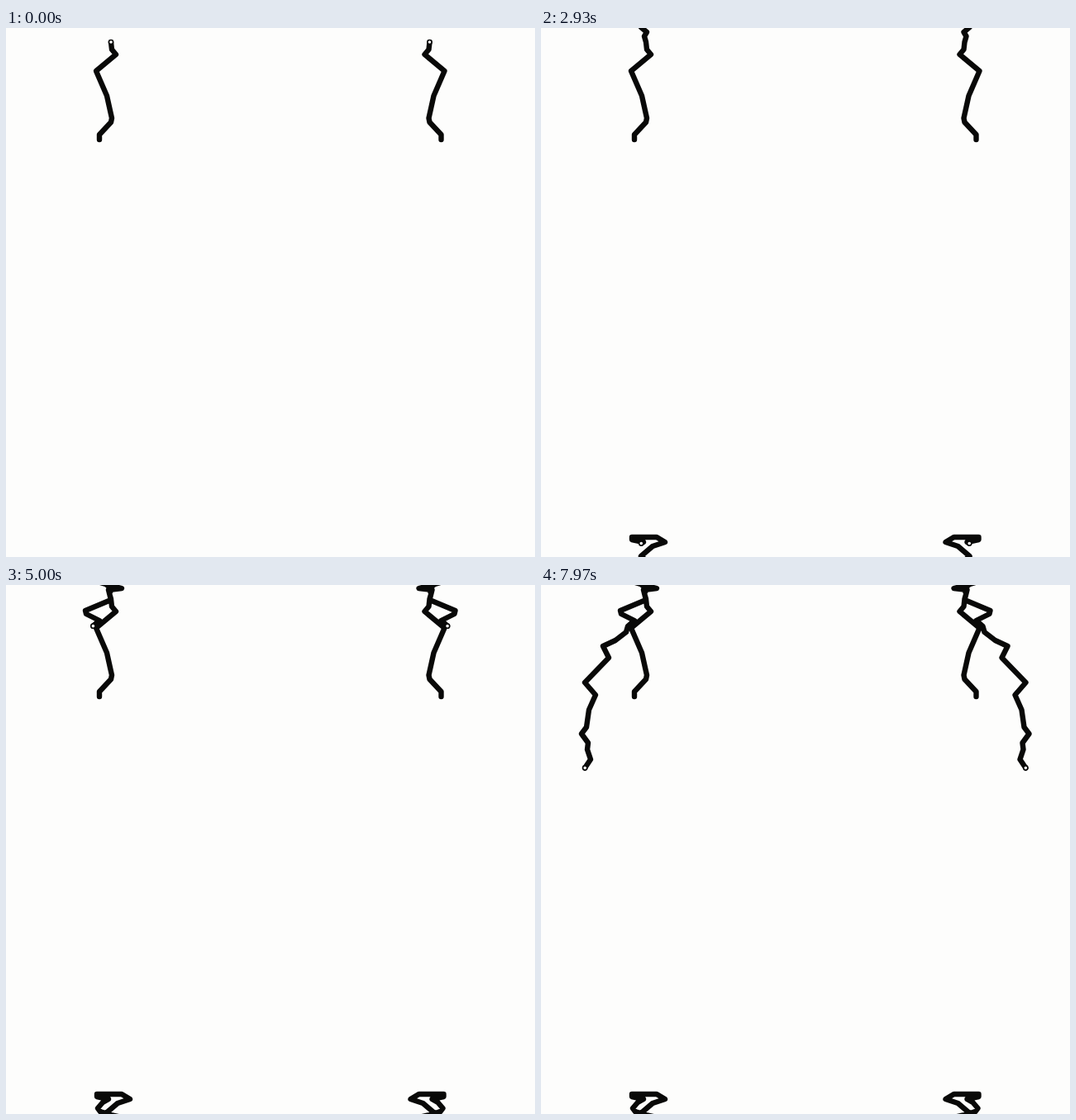
Write an HTML page without scripts that moves like this. It is 640 px wide and 640 px high and loops after 8000 ms.

```html
<!DOCTYPE html>
<html lang="en">
<head>
<meta charset="utf-8">
<title>Mirrored walk</title>
<style>
  html, body { margin: 0; width: 100%; height: 100%; overflow: hidden; background: #fdfdfc; }
  svg { display: block; width: 100vw; height: 100vh; }
  #walk { fill: none; stroke: #090908; stroke-width: 6.4; stroke-linecap: round; stroke-linejoin: round; }
  .tip { fill: #fdfdfc; stroke: #090908; stroke-width: 1.6; }
</style>
</head>
<body>
<svg viewBox="0 0 640 640">
  <defs>
    <!-- One walk, revealed by its dash; y < 0 reappears at the bottom in the lower copy -->
    <g id="side">
      <path id="walk" pathLength="617" stroke-dasharray="617 700" stroke-dashoffset="477"
        d="M113 135V129L127 114 128 109 122 82 109 52 133 32 128 26 127 17
           125 10 128 5 121-1 135-13 150-18 140-24 110-24V-21L124-18 117-14 111-7 114-3 127 1
           140 4 124 6 127 18 96 31 97 35 113 43 105 50
           103 57 90 67 75 74 82 88 53 118
           66 133 58 151 55 172 49 180 57 191 56 199 60 211 52 223">
        <animate attributeName="stroke-dashoffset" dur="8s" repeatCount="indefinite"
          keyTimes="0;.466;.625;1" values="477;326;218;0"/>
      </path>
      <circle class="tip" r="2.6">
        <animateMotion dur="8s" repeatCount="indefinite" calcMode="linear"
          keyTimes="0;.466;.625;1" keyPoints=".227;.472;.647;1">
          <mpath href="#walk"/>
        </animateMotion>
      </circle>
    </g>
    <g id="half">
      <use href="#side"/>
      <use href="#side" y="640"/>
    </g>
  </defs>
  <use href="#half"/>
  <use href="#half" transform="translate(639.5) scale(-1 1)"/>
</svg>
</body>
</html>
```
